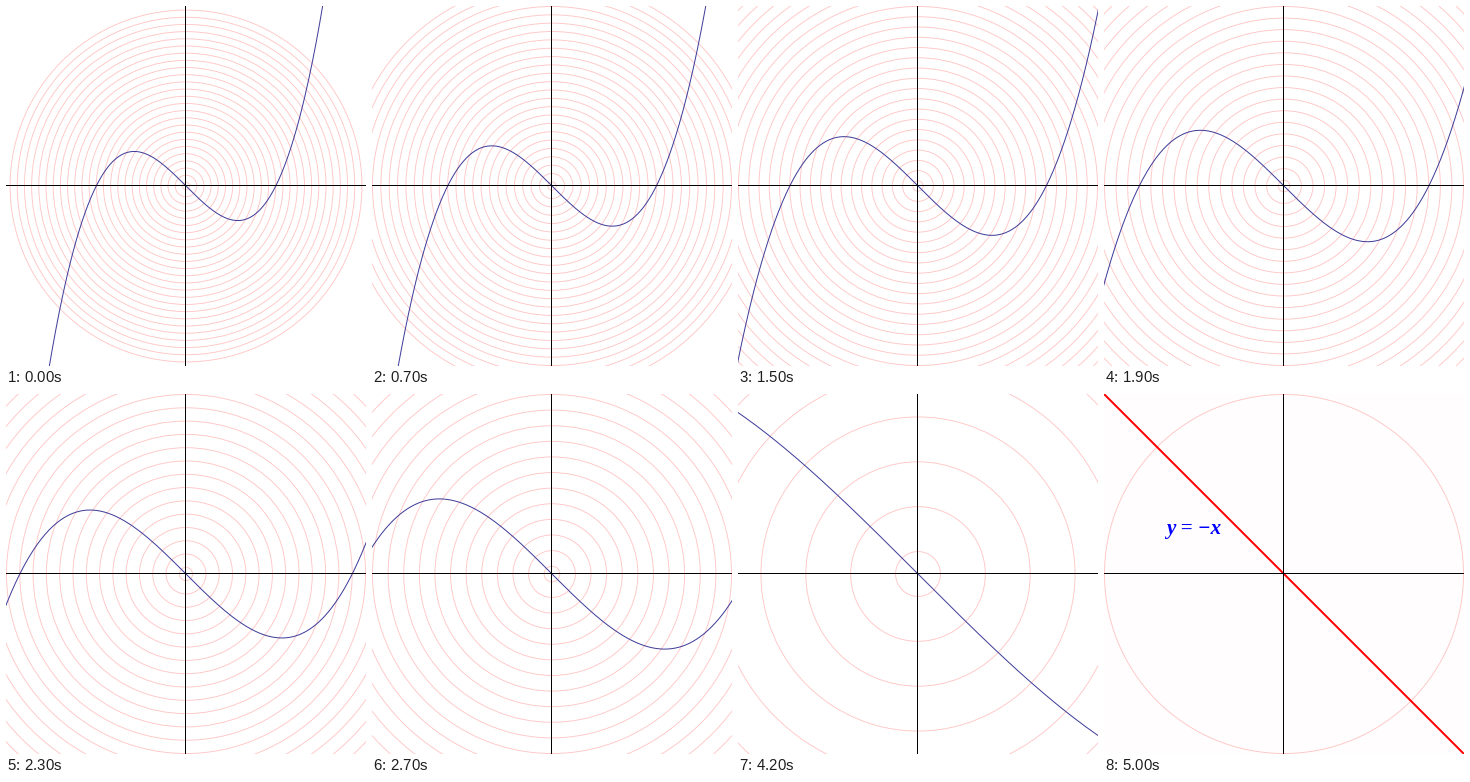
Write a matplotlib script that moves like this. It is 360x360 px and loops after 6000 ms.

```python
import matplotlib.pyplot as plt
import numpy as np
from matplotlib.animation import FuncAnimation
from matplotlib.patches import Circle

SIZE, DPI = 360, 100
MID, HALF = 180, 179.5     # centre and half-width of the view, in pixels
AXIS = 179.5               # middle of the pixel row and column of the axes
STEP = 0.04                # the view's half-range shrinks by this each frame
ZOOM_FRAMES, FRAMES = 50, 60
PX = 72 / DPI              # one pixel in points

fig = plt.figure(figsize=(SIZE / DPI, SIZE / DPI), dpi=DPI, facecolor="white")
ax = fig.add_axes([0, 0, 1, 1])
ax.set_xlim(0, SIZE)
ax.set_ylim(SIZE, 0)
ax.axis("off")

radii = STEP * np.arange(1, 50, 2)
rings = [ax.add_patch(Circle((MID, MID), 1, fill=False, ec="#ffc6c6",
                             lw=0.9 * PX, zorder=1)) for _ in radii]

px = np.linspace(-2, SIZE + 2, 500)
curve, = ax.plot([], [], color="#3f3d99", lw=PX, zorder=2)
line, = ax.plot([-2, SIZE + 2], [-2, SIZE + 2], color="#ff0000",
                lw=2 * PX, zorder=2)
for xs, ys in [((0, SIZE), (AXIS, AXIS)), ((AXIS, AXIS), (0, SIZE))]:
    ax.plot(xs, ys, color="black", lw=PX, snap=False, zorder=3)
label = ax.text(62, 140, "y = \u2212x", color="#0000ff", fontsize=21 * PX,
                family="Liberation Serif", style="italic", weight="bold",
                ha="left", va="baseline", zorder=4)


def draw(frame):
    done = frame >= ZOOM_FRAMES
    half_range = 2 - STEP * min(frame, ZOOM_FRAMES - 1)
    scale = HALF / half_range
    for ring, r in zip(rings, radii):
        ring.set_radius(r * scale)
        ring.set_visible(r * scale < 260)
    x = (px - MID) / scale
    curve.set_data(px, MID - (x**3 - x) * scale)
    curve.set_visible(not done)
    line.set_visible(done)
    label.set_visible(done)
    fig.set_facecolor("#fffdfd" if done else "white")
    return [*rings, curve, line, label]


anim = FuncAnimation(fig, draw, frames=FRAMES, interval=100,
                     repeat=True, repeat_delay=0, blit=False)
plt.show()
```
